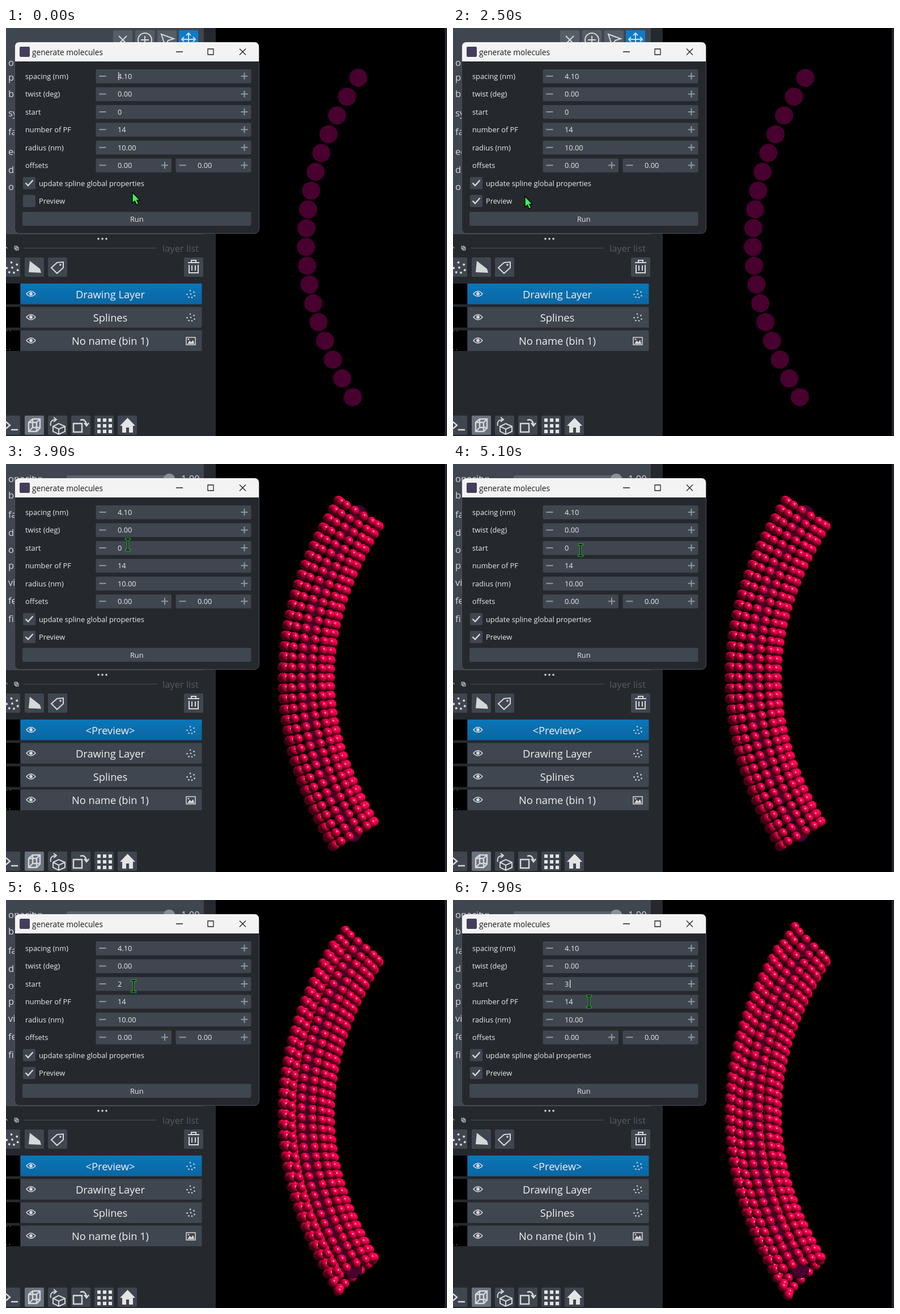
Animation, 778 px wide and 720 px high, one loop 8000 ms. Source, as an HTML page with a canvas:

```html
<!DOCTYPE html>
<html lang="en">
<head>
<meta charset="utf-8">
<title>Generate molecules</title>
<style>
html, body { margin: 0; width: 100%; height: 100%; overflow: hidden; background: #000; }
svg, canvas { position: absolute; left: 0; top: 0; width: 778px; height: 720px; }
svg { font: 12.8px "Open Sans", "Noto Sans", sans-serif; fill: #e9eaeb; }
.line { fill: none; stroke: #d6d8da; stroke-width: 2; }
.side { font-size: 16.5px; fill: #d8dadc; }
.layer { font-size: 18.3px; fill: #f0f1f2; text-anchor: middle; }
.step { stroke: #92979c; stroke-width: 2; fill: none; }

.tick, .before, .after, .s0, .s1, .s2, .s3, .caret1, .caret2, .arrow, .beam, #cursor {
  animation: 8s step-end infinite;
}
.tick { animation-name: tick; }
.before { animation-name: before; }
.after { animation-name: after; }
.s0 { animation-name: s0; }
.s1 { animation-name: s1; }
.s2 { animation-name: s2; }
.s3 { animation-name: s3; }
.caret1 { animation-name: caret1; }
.caret2 { animation-name: caret2; }
.arrow { animation-name: arrow; }
.beam { animation-name: beam; }
#cursor { animation-name: move; animation-timing-function: ease-in-out; }

@keyframes tick { 0% { opacity: 0 } 20%, 100% { opacity: 1 } }
@keyframes before { 0% { opacity: 1 } 46.25%, 100% { opacity: 0 } }
@keyframes after { 0% { opacity: 0 } 46.25%, 100% { opacity: 1 } }
@keyframes s0 { 0% { opacity: 1 } 68.75%, 100% { opacity: 0 } }
@keyframes s1 { 0% { opacity: 0 } 68.75% { opacity: 1 } 73.75%, 100% { opacity: 0 } }
@keyframes s2 { 0% { opacity: 0 } 73.75% { opacity: 1 } 78.75%, 100% { opacity: 0 } }
@keyframes s3 { 0% { opacity: 0 } 78.75%, 100% { opacity: 1 } }
@keyframes caret1 { 0%, 13.25% { opacity: 1 } 6.625%, 19.875%, 100% { opacity: 0 } }
@keyframes caret2 {
  0%, 75.375%, 88.625% { opacity: 0 }
  68.75%, 82%, 95.25%, 100% { opacity: 1 }
}
@keyframes arrow { 0% { opacity: 1 } 42%, 100% { opacity: 0 } }
@keyframes beam { 0% { opacity: 0 } 42%, 100% { opacity: 1 } }
@keyframes move {
  0%, 2.5% { transform: translate(223px, 290px) }
  13%, 21% { transform: translate(51px, 305px) }
  29%, 37.5% { transform: translate(127px, 297px) }
  47%, 50% { transform: translate(215px, 142px) }
  58%, 80% { transform: translate(225px, 152px) }
  91%, 100% { transform: translate(240px, 179px) }
}
</style>
</head>
<body>
<svg id="ui" viewBox="0 0 778 720"></svg>
<canvas id="spline" width="778" height="720"></canvas>
<div id="tubes" class="after"></div>
<svg id="top" viewBox="0 0 778 720">
  <g id="cursor">
    <path class="arrow" d="M0 0V19L4.3 15.3 7.3 22 10.8 20.3 7.8 13.8H13Z" fill="#3df558" stroke="#000" stroke-width="1.3"/>
    <g class="beam" fill="none">
      <path d="M-5 -10H5M0 -10V10M-5 10H5" stroke="#2fb536" stroke-width="3.4"/>
      <path d="M-4 -10H4M0 -10V10M-4 10H4" stroke="#000" stroke-width="1.4"/>
    </g>
  </g>
</svg>
<script>
const PANEL = '#25292e', FIELD = '#40464f';

const box = (x, y, w, h, fill, r = 0) =>
  `<rect x="${x}" y="${y}" width="${w}" height="${h}" rx="${r}" fill="${fill}"/>`;
const text = (x, y, s, attrs = '') => `<text x="${x}" y="${y}" ${attrs}>${s}</text>`;
const line = (d, attrs = '') => `<path class="line" d="${d}" ${attrs}/>`;
const solid = (d, fill = '#d6d8da') => `<path d="${d}" fill="${fill}"/>`;
const dot = (x, y, r) => `<circle cx="${x}" cy="${y}" r="${r}" fill="#d6d8da"/>`;
const at = (x, y, s, k = 1) => `<g transform="translate(${x} ${y}) scale(${k})">${s}</g>`;
const group = (cls, s) => `<g class="${cls}">${s}</g>`;

const dots = [[-6.5, 1], [-1, -5.5], [0, 0.5], [5.5, -3], [6.5, 3.5], [-3.5, 6], [2, 6.5]]
  .map(([x, y]) => dot(x, y, 1.3)).join('');
const eye = line('M-8 0Q0 -9 8 0Q0 9 -8 0Z', 'style="stroke-width:1.5"') + dot(0, 0, 2.9);
const picture = line('M-8 -6.5H8V6.5H-8Z', 'style="stroke-width:1.5"') +
  solid('M-6 5L-2 -1 1 2 4 -2 6.5 5Z') + dot(-4, -3, 1.4);
const check = line('M-6.5 0L-2 4.5 6.5 -5', 'style="stroke-width:2.4"');

function sideLabels(ys, names) {
  return names.map((s, i) => text(4, ys[i] + 5, s, 'class="side"')).join('');
}

function layers(names) {
  return names.map((name, i) => {
    const y = 451 + i * 41.2, mid = y + 18;
    const last = i === names.length - 1;
    return box(0, y, 25, 36.5, '#000') + box(25.5, y, 320, 36.5, i ? FIELD : 'url(#selected)', 1) +
      text(184, y + 25.5, name, 'class="layer"') + at(44, mid, eye) +
      at(326, mid + (last ? 1 : 0), last ? picture : dots) +
      (last ? line(`M1 ${y + 1}H12M0 ${y + 34}H10`, 'style="stroke-width:1;stroke-dasharray:1 5"') : '');
  }).join('');
}

function spinBox(x, y, w, value) {
  const m = y + 12;
  return box(x, y, w, 24.5, FIELD, 2) +
    `<path class="step" d="M${x + 6} ${m}h12M${x + w - 18} ${m}h12m-6 -6v12"/>` +
    text(x + 38.5, y + 17, value);
}

function dialog() {
  const rows = [['spacing (nm)', '4.10'], ['twist (deg)', '0.00'], ['start', ''],
    ['number of PF', '14'], ['radius (nm)', '10.00']];
  let s = `<rect x="15.5" y="25.5" width="431" height="337" rx="8" fill="${PANEL}" stroke="#4b5056"/>` +
    solid('M16 59V33Q16 25 24 25H438Q446 25 446 33V59Z', '#f3f3f3') +
    box(24, 33, 18, 18, '#463d5c', 2) +
    text(46, 47.5, 'generate molecules', 'style="font-size:13.7px;fill:#191919"') +
    line('M300 42H312M356 37H366V47H356ZM412 36.5L423 47.5M423 36.5L412 47.5',
      'style="stroke:#222;stroke-width:1.3"');
  rows.forEach(([name, value], i) => {
    const y = 73 + i * 31.45;
    s += text(34, y + 17, name) + spinBox(158.5, y, 274, value);
  });
  for (let n = 0; n < 4; n++) s += text(197, 152.9, n, `class="s${n}"`);
  s += text(34, 247.2, 'offsets') + spinBox(158.5, 230.2, 133.5, '0.00') +
    spinBox(299.5, 230.2, 133, '0.00') +
    box(30, 263, 22, 21.5, FIELD, 2) + at(41, 273.5, check) +
    text(58, 278.7, 'update spline global properties') +
    box(30, 294.5, 22, 21.5, FIELD, 2) + group('tick', at(41, 305, check)) +
    text(58, 310.2, 'Preview') +
    box(29, 324.5, 403.5, 24.5, FIELD, 2) +
    text(230.7, 341.7, 'Run', 'text-anchor="middle"') +
    group('caret1', box(198, 78, 1.5, 14, '#c9cbcd')) +
    group('caret2', box(206, 141, 1.3, 14, '#e9eaeb'));
  return s;
}

function topControls() {
  const tool = (x, fill) => box(x, 4, 34, 34, fill, 2);
  const before = tool(189, '#565d66') + tool(228, '#565d66') + tool(267, '#565d66') + tool(305, '#0e7cc8') +
    line('M199 14L213 28M213 14L199 28') +
    line('M233 21a12 12 0 1 0 24 0a12 12 0 1 0 -24 0M245 14V28M238 21H252') +
    line('M274 11L296 19 286 22 281 32Z') +
    line('M322 10V32M311 20H333M318 13L322 9 326 13M314 16L310 20 314 24M330 16L334 20 330 24') +
    sideLabels([62, 88, 117, 151, 184, 219, 251, 281],
      ['opacity:', 'point size:', 'blending:', 'symbol:', 'face color:', 'edge color:', 'display text:', 'out of slice:']);
  const after = sideLabels([27, 56, 90, 122, 152, 180, 210, 242, 274],
      ['opacity:', 'blending:', 'face color:', 'display text:', 'out of slice:', 'point size:', 'visibility:', 'features:', 'filter:']) +
    box(107, 20, 186, 10, '#5a626c', 3) + box(278, 17, 20, 20, '#8b9097', 9) +
    text(309, 32, '1.00', 'class="side"');
  return box(0, 0, 349, 364, FIELD) + group('before', before) + group('after', after);
}

function toolbars() {
  const button = (x, y, fill = FIELD) => box(x, y, 34, 34, fill, 2);
  let s = dot(163, 372, 1.8) + dot(170, 372, 1.8) + dot(177, 372, 1.8) +
    line('M0 386l3 3M15 385h5v5h-5zM17 387h5v5h-5z', 'style="stroke-width:1"') +
    line('M31 388.5H266', 'style="stroke:#4b5049;stroke-width:1"') +
    text(276, 395, 'layer list', 'style="font-size:16.5px;fill:#555b63"');
  for (const x of [-9, 33, 74, 314]) s += button(x, 405);
  s += at(11, 422, dots, 1.5) + solid('M42 411L60 425 62 432 40 431Z') +
    line('M80 423L90 414 101 413 101 423 90 433Z') + dot(96, 418, 1.8) +
    line('M321 414H341M327 413V410H335V413M323 418V432H339V418M328 419V428M334 419V428');
  [-9, 33, 74, 115, 156, 197].forEach((x, i) => { s += button(x, 684, i === 1 ? '#69727e' : FIELD); });
  s += line('M0 695L7 701 0 707M9 709H21', 'style="stroke-width:2.5"') +
    line('M40 696L47 690H60V706L54 712H40ZM40 696H54V712M54 696L60 690M47 690V705H60M47 705L40 712',
      'style="stroke-width:2.4"') +
    line('M83 703L93 698 104 703V712L93 717 83 712ZM83 703L93 708 104 703M93 708V717') +
    line('M79 702Q77 692 87 691M84 687L89 691 84 695') +
    line('M119 698H134V713H119ZM131 692Q140 689 142 700M138 697L142 702 146 697', 'style="stroke-width:2.5"');
  for (let i = 0; i < 9; i++) s += box(161 + i % 3 * 10, 689 + (i / 3 | 0) * 10, 6, 6, '#e3e4e5');
  return s + solid('M201 702L214.5 688 228 702H224V714H217V705H212V714H205V702Z', '#e3e4e5');
}

document.getElementById('ui').innerHTML =
  `<linearGradient id="selected" x2="0" y2="1"><stop stop-color="#0a76b8"/>
   <stop offset="1" stop-color="#0b66a2"/></linearGradient>` +
  box(0, 0, 370, 720, PANEL) + box(774, 0, 4, 720, '#22272b') + topControls() + toolbars() +
  group('before', layers(['Drawing Layer', 'Splines', 'No name (bin 1)'])) +
  group('after', layers(['&lt;Preview&gt;', 'Drawing Layer', 'Splines', 'No name (bin 1)'])) +
  dialog();

// The spline is a parabola, handled through its slope m.
const A = 0.0011, X0 = 529.3, Y0 = 377.5, TOP = 88, BOTTOM = 651.5;
const PF = 14, ROWS = 36, RADIUS = 42.3, BALL = 8.7, NODE = 16;
const slope = y => 2 * A * (y - Y0);
const arc = m => (m * Math.hypot(1, m) + Math.asinh(m)) / (4 * A);
const START = arc(slope(TOP)) - 0.7;
const PITCH = (arc(slope(BOTTOM)) + 1.5 - START) / (ROWS - 1);

const nodes = Array.from({ length: 18 }, (_, i) => {
  const y = TOP + i * (BOTTOM - TOP) / 17;
  return { x: X0 + A * (y - Y0) ** 2, y };
});

function spineAt(s) {
  let m = 0;
  for (let i = 0; i < 8; i++) m -= (arc(m) - s) * 2 * A / Math.hypot(1, m);
  const n = Math.hypot(1, m);
  return { x: X0 + m * m / (4 * A), y: Y0 + m / (2 * A), nx: 1 / n, ny: -m / n };
}

// Lit from the upper right, halfway towards the viewer.
function ballColor(u, v, w) {
  const light = 0.3 + Math.max(0, (u - v + w) / Math.sqrt(3));
  const shine = 210 * Math.max(0, 0.325 * (u - v) + 0.888 * w) ** 80;
  return [216 * light + shine, shine, 64 * light + shine];
}

const nodeColor = (u, v) => Math.hypot(u, v) > 0.93 ? [8, 0, 8] : [72, 0, 47];

// Draws discs and balls with a depth buffer, at twice the stage size.
function makeTube(start) {
  const S = 2, W = 778 * S, H = 720 * S;
  const canvas = document.createElement('canvas');
  canvas.width = W;
  canvas.height = H;
  const ctx = canvas.getContext('2d');
  const image = ctx.createImageData(W, H);
  const depth = new Float32Array(W * H).fill(-1e6);

  function plot(cx, cy, cz, r, bulge, color) {
    for (let py = Math.floor((cy - r) * S); py <= (cy + r) * S; py++) {
      for (let px = Math.floor((cx - r) * S); px <= (cx + r) * S; px++) {
        const u = ((px + 0.5) / S - cx) / r, v = ((py + 0.5) / S - cy) / r;
        const q = 1 - u * u - v * v;
        if (q < 0) continue;
        const w = Math.sqrt(q), z = cz + bulge * w, i = py * W + px;
        if (z <= depth[i]) continue;
        depth[i] = z;
        image.data.set(color(u, v, w), i * 4);
        image.data[i * 4 + 3] = 255;
      }
    }
  }

  for (const { x, y } of nodes) plot(x, y, 0, NODE, 0, nodeColor);
  for (let k = -PF / 2; k < PF / 2; k++) {
    const angle = k * 2 * Math.PI / PF;
    const side = RADIUS * Math.cos(angle), z = RADIUS * Math.sin(angle);
    for (let i = 0; i < ROWS; i++) {
      const p = spineAt(START + PITCH * (i - start * k / PF));
      plot(p.x + side * p.nx, p.y + side * p.ny, z, BALL, BALL, ballColor);
    }
  }
  ctx.putImageData(image, 0, 0);
  return canvas;
}

const spline = document.getElementById('spline').getContext('2d');
spline.fillStyle = '#48002f';
for (const { x, y } of nodes) {
  spline.beginPath();
  spline.arc(x, y, NODE, 0, 7);
  spline.fill();
}
for (let n = 0; n < 4; n++) {
  const tube = makeTube(n);
  tube.className = 's' + n;
  document.getElementById('tubes').append(tube);
}
</script>
</body>
</html>
```
